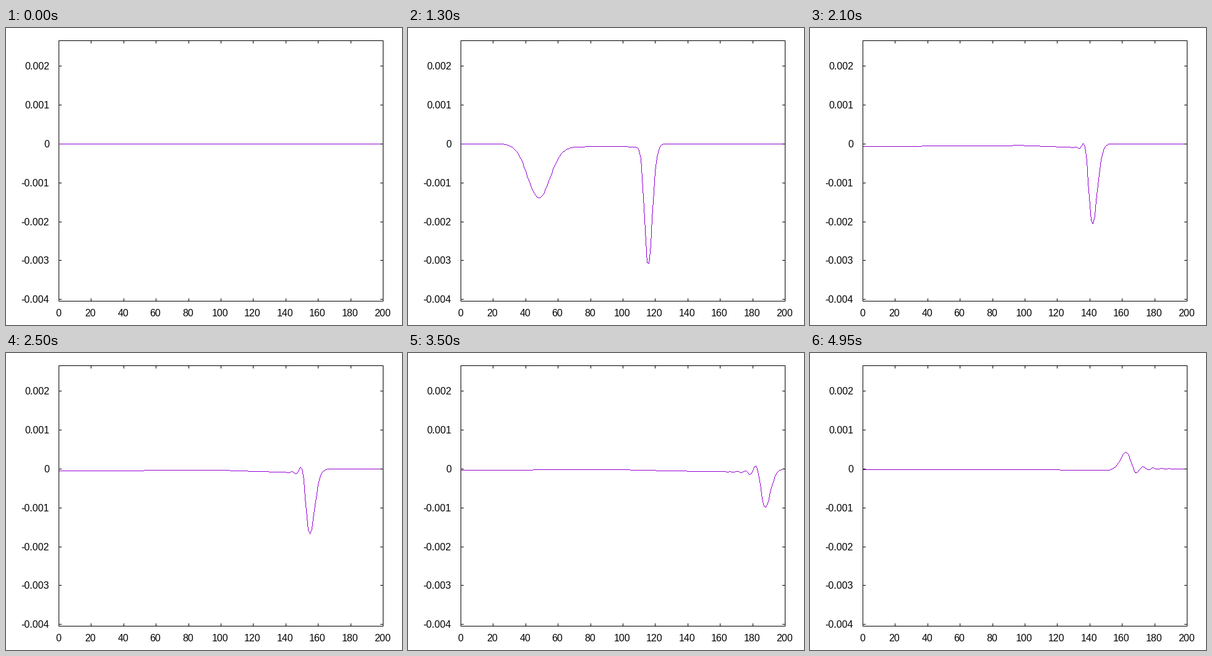
Recreate the animation shown at these times as a matplotlib script. Size 640 by 480 pixels, loop 5 s.

```python
"""Gaussian pulse hitting a lossy dielectric: magnetic field of a 1D FDTD run."""
import numpy as np
import matplotlib.pyplot as plt
from matplotlib.animation import FuncAnimation

plt.rcParams["text.hinting"] = "default"

W, H, DPI = 640, 480, 100
FRAMES, STEPS_PER_FRAME, INTERVAL = 100, 5, 50

# Simulation
CELLS, SOURCE, SLAB = 200, 50, 100
Z0, EPS_R, LOSS = 377.0, 9.0, 0.005

# Plot box in pixels
LEFT, RIGHT, TOP, BOTTOM = 85, 609, 20, 441
ZERO_ROW, PX_PER_CELL, PX_PER_MILLI = 186.82, 2.62, 62.89
TICK = 5

BLACK, PURPLE = (0, 0, 0), (148, 0, 211)


def pulse(t):
    return np.exp(-(t - 30) ** 2 / 100)


def simulate():
    """Return one snapshot of the magnetic field per frame."""
    in_slab = np.arange(CELLS) >= SLAB
    keep = np.where(in_slab, (1 - LOSS) / (1 + LOSS), 1.0)
    gain = np.where(in_slab, Z0 / EPS_R / (1 + LOSS), Z0)
    ez, hy = np.zeros(CELLS), np.zeros(CELLS)
    snapshots = []
    for step in range(FRAMES * STEPS_PER_FRAME):
        hy[:-1] += np.diff(ez) / Z0
        hy[SOURCE - 1] -= pulse(step) / Z0
        ez[0] = ez[1]  # absorbing left end
        ez[1:] = keep[1:] * ez[1:] + gain[1:] * np.diff(hy)
        ez[SOURCE] += pulse(step + 1)
        if step % STEPS_PER_FRAME == 0:
            snapshots.append(hy[:-1].copy())
    return snapshots


def to_px(value):
    return np.floor(np.asarray(value) + 0.5).astype(int)


def col(x):
    return to_px(LEFT + PX_PER_CELL * x)


def row(milli):
    return to_px(ZERO_ROW - PX_PER_MILLI * milli)


def bresenham(major0, minor0, major1, minor1):
    """Pixels from end to end, walking up the longer axis."""
    if major0 > major1:
        major0, minor0, major1, minor1 = major1, minor1, major0, minor0
    major = np.arange(major0, major1 + 1)
    rise = minor1 - minor0
    part = (major - major0) / max(major1 - major0, 1)
    return major, minor0 + np.sign(rise) * to_px(abs(rise) * part)


def trace(field):
    """Mask of a one-pixel polyline through the field samples."""
    mask = np.zeros((H, W), bool)
    xs, ys = col(np.arange(len(field))), row(field * 1000)
    for x0, y0, x1, y1 in zip(xs, ys, xs[1:], ys[1:]):
        if abs(y1 - y0) > x1 - x0:
            y, x = bresenham(y0, x0, y1, x1)
        else:
            x, y = bresenham(x0, y0, x1, y1)
        mask[y, x] = True
    return mask


def draw_border(canvas):
    canvas[[TOP, BOTTOM], LEFT:RIGHT + 1] = BLACK
    canvas[TOP:BOTTOM + 1, [LEFT, RIGHT]] = BLACK


def draw_ticks(canvas):
    for x in col(np.arange(0, 201, 20)):
        canvas[TOP:TOP + TICK, x] = BLACK
        canvas[BOTTOM - TICK + 1:BOTTOM + 1, x] = BLACK
    for y in row(np.arange(-4, 3)):
        canvas[y, LEFT:LEFT + TICK] = BLACK
        canvas[y, RIGHT - TICK + 1:RIGHT + 1] = BLACK


curves = [trace(field) for field in simulate()]

fig = plt.figure(figsize=(W / DPI, H / DPI), dpi=DPI, facecolor="white")
ax = fig.add_axes([0, 0, 1, 1])
ax.axis("off")


def render(i):
    canvas = np.full((H, W, 3), 255, np.uint8)
    draw_ticks(canvas)
    canvas[curves[i]] = PURPLE
    draw_border(canvas)
    return canvas


image = ax.imshow(render(0), extent=(0, W, H, 0), aspect="auto",
                  interpolation="nearest")
ax.set_xlim(0, W)
ax.set_ylim(H, 0)

font = dict(family="Liberation Sans", size=16 * 72 / DPI, color="black",
            va="baseline")
for x in range(0, 201, 20):
    ax.text(col(x) - 0.5, 466, str(x), ha="center", **font)
for milli in range(-4, 3):
    ax.text(70, row(milli) + 6, f"{milli / 1000:g}", ha="right", **font)


def update(i):
    image.set_data(render(i))
    return [image]


anim = FuncAnimation(fig, update, frames=FRAMES, interval=INTERVAL,
                     repeat=True, repeat_delay=0)
plt.show()
```
